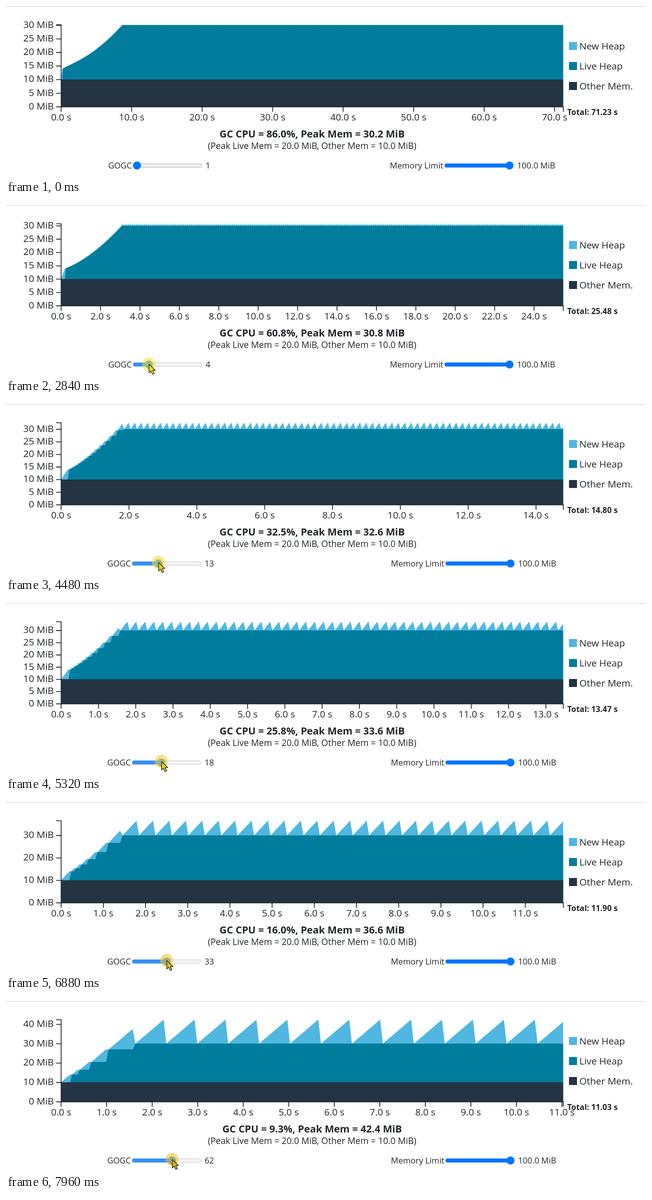
These frames come from a looping animation (1280 by 342 pixels, 8 s). An HTML page:

```html
<!DOCTYPE html>
<html lang="en">
<head>
<meta charset="utf-8">
<title>GC memory chart</title>
<style>
  html, body { margin: 0; width: 100%; height: 100%; overflow: hidden; background: #fff; }
  svg { display: block; width: 100vw; height: 100vh; }
  text { font-family: "Open Sans", "Noto Sans", sans-serif; fill: #212529; }
  .big { font-size: 19px; }
  .tick { font-size: 18.8px; text-anchor: middle; }
  .ylab { font-size: 19px; text-anchor: end; }
  .mid { text-anchor: middle; }
  .bold { font-weight: 700; }
  .ctl { font-size: 16.5px; }
  .end { text-anchor: end; }
  .axis { fill: none; stroke: #1c2026; stroke-width: 1.6; }
</style>
</head>
<body>
<svg id="stage" viewBox="0 0 1280 342"></svg>
<script>
const LOOP = 8000;
const LEFT = 110, RIGHT = 1114.3, TOP = 37.2, BASE = 201.3;
const COLORS = { fresh: '#50b7e0', live: '#007d9c', other: '#253443' };
const OTHER = 10, MAX_LIVE = 20, ALLOC_RATE = 20, WORK = 10;

const stage = document.getElementById('stage');

function add(tag, attrs, parent = stage, text) {
  const node = document.createElementNS('http://www.w3.org/2000/svg', tag);
  set(node, attrs);
  if (text !== undefined) node.textContent = text;
  parent.appendChild(node);
  return node;
}

function set(node, attrs) {
  for (const k in attrs) node.setAttribute(k, attrs[k]);
}

// Heap model: returns points [time, live, fresh] plus summary numbers.
function simulate(gogc) {
  const points = [[0, 0, 0]];
  let work = 0, gc = 0, live = 0, peak = 0;
  let room = 4;
  for (;;) {
    const dt = Math.min(room / ALLOC_RATE, WORK - work);
    work += dt;
    const heap = live + dt * ALLOC_RATE;
    peak = Math.max(peak, heap);
    points.push([work + gc, live, heap - live]);
    if (work >= WORK - 1e-9) break;
    live = Math.min(heap, MAX_LIVE);
    gc += 0.04 + live / 1024;
    points.push([work + gc, live, 0]);
    room = Math.max(0.063, live * gogc / 100);
  }
  return { points, total: work + gc, share: gc / (work + gc), peak: peak + OTHER };
}

function tickStep(span, count) {
  const raw = span / count;
  const pow = 10 ** Math.floor(Math.log10(raw));
  const r = raw / pow;
  return pow * (r >= Math.sqrt(50) ? 10 : r >= Math.sqrt(10) ? 5 : r >= Math.SQRT2 ? 2 : 1);
}

// Static parts
add('rect', { width: 1280, height: 342, fill: '#fff' });
add('rect', { width: 1280, height: 1, fill: '#cfcfcf' });
const fresh = add('path', { fill: COLORS.fresh });
const live = add('path', { fill: COLORS.live });
const other = add('rect', { x: LEFT, width: RIGHT - LEFT, fill: COLORS.other });
const axis = add('path', { class: 'axis', transform: 'translate(0.3 0.3)' });
const labels = add('g', {});
[['New Heap', COLORS.fresh], ['Live Heap', COLORS.live], ['Other Mem.', COLORS.other]].forEach(([name, fill], i) => {
  add('rect', { x: 1126, y: 72 + i * 40, width: 16, height: 16, fill });
  add('text', { x: 1146.7, y: 86.8 + i * 40, class: 'big' }, stage, name);
});
const total = add('text', { x: 1122.5, y: 217.5, class: 'bold', 'font-size': 15.9 });
const title = add('text', { x: 612.3, y: 263, class: 'bold mid', 'font-size': 19.85 });
add('text', { x: 612.2, y: 286, class: 'mid', 'font-size': 17.6 }, stage,
  '(Peak Live Mem = 20.0 MiB, Other Mem = 10.0 MiB)');

function slider(name, x) {
  const g = add('g', {});
  add('text', { x: x - 2.3, y: 325.3, class: 'ctl end' }, g, name);
  const track = add('rect', { x: x + 0.5, y: 315.5, width: 137, height: 7.2, rx: 3.6, 'stroke-width': 1 }, g);
  const fill = add('rect', { x, y: 315, height: 8.1, rx: 4 }, g);
  const thumb = add('circle', { cy: 319, r: 8 }, g);
  const value = add('text', { x: x + 145.2, y: 325.3, class: 'ctl' }, g);
  return {
    update(pos, text, look, shift) {
      set(g, { transform: `translate(${shift} 0)` });
      set(track, { fill: look.track, stroke: look.border });
      set(fill, { width: pos - x, fill: look.accent });
      set(thumb, { cx: pos, fill: look.accent });
      value.textContent = text;
    }
  };
}
const LOOKS = {
  rest: { track: '#efefef', border: '#b8b8b8', accent: '#0075ff' },
  hover: { track: '#e5e5e5', border: '#a8a8a8', accent: '#005cc8' },
  press: { track: '#f5f5f5', border: '#cbcbcb', accent: '#3a8ff5' }
};
const gogcSlider = slider('GOGC', 254);
const limitSlider = slider('Memory Limit', 877);

const halo = add('circle', { r: 13 });
const arrow = add('path', {
  d: 'M0 0V17L4 13.4L7 20L10.2 18.6L7.3 12.2H12.6Z',
  stroke: '#2c2a14', 'stroke-width': 1.3, 'stroke-linejoin': 'round'
});

// Draw the chart for one GOGC setting
let shown = 0;
function drawChart(gogc) {
  if (gogc === shown) return;
  shown = gogc;
  const sim = simulate(gogc);
  const px = s => LEFT + s / sim.total * (RIGHT - LEFT);
  const py = m => BASE - m / sim.peak * (BASE - TOP);
  const area = height => `M${LEFT} ${BASE}` + sim.points.map(p =>
    `L${px(p[0]).toFixed(2)} ${py(OTHER + height(p)).toFixed(2)}`).join('') + `L${RIGHT} ${BASE}Z`;
  set(fresh, { d: area(p => p[1] + p[2]) });
  set(live, { d: area(p => p[1]) });
  set(other, { y: py(OTHER), height: BASE - py(OTHER) });

  let d = `M100 ${TOP}H${LEFT}V${BASE}H100M${LEFT} ${BASE + 10}V${BASE}H${RIGHT}V${BASE + 10}`;
  labels.textContent = '';
  const ys = tickStep(sim.peak, 5);
  for (let m = 0; m <= sim.peak + 1e-6; m += ys) {
    d += `M100 ${py(m)}H${LEFT}`;
    add('text', { x: 95.5, y: py(m) + 5.5, class: 'ylab' }, labels, m + ' MiB');
  }
  const xs = tickStep(sim.total, 10);
  for (let s = 0; s <= sim.total; s += xs) {
    d += `M${px(s)} ${BASE}v10`;
    add('text', { x: px(s) + 0.3, y: 229, class: 'tick' }, labels, s.toFixed(1) + ' s');
  }
  set(axis, { d });
  total.textContent = `Total: ${sim.total.toFixed(2)} s`;
  title.textContent = `GC CPU = ${(sim.share * 100).toFixed(1)}%, Peak Mem = ${sim.peak.toFixed(1)} MiB`;
}

// Drag bursts: [start ms, end ms, steps, log2(GOGC) reached]
const DRAG = [
  [1430, 1680, 4, 0.85], [1910, 2140, 4, 1.2], [2290, 2520, 4, 1.55], [2670, 2840, 3, 1.95],
  [2990, 2990, 1, 2], [3170, 3300, 3, 2.3], [3470, 3780, 5, 3.1], [4080, 4480, 6, 3.7],
  [4920, 5470, 8, 4.33], [5700, 5700, 1, 4.34], [5940, 6330, 6, 4.8], [6480, 6560, 2, 4.95],
  [6880, 6940, 2, 5.14], [7110, 7270, 3, 5.4], [7410, 7960, 8, 5.955]
];
const PRESS = 1130;

// Share of a stepped burst done at time t
function stepped(t, start, end, n) {
  if (t < start) return 0;
  if (t >= end) return 1;
  return (Math.floor((t - start) / (end - start) * (n - 1) + 0.2) + 1) / n;
}

function dragValue(t) {
  let v = 0;
  for (const [start, end, n, goal] of DRAG) {
    if (t < start) break;
    v += (goal - v) * stepped(t, start, end, n);
  }
  return v;
}

function pointer(t, thumbX) {
  if (t < 120) return null;
  if (t < 980) {
    const p = stepped(t, 120, 910, 11);
    const e = 1 - (1 - p) ** 2;
    return [580 - 314 * e, 340 - 23 * e];
  }
  if (t < 1430) return [263.5, 318];
  return [thumbX, t < 3470 ? 318 : 316.5];
}

function draw(t) {
  const v = dragValue(t);
  const gogc = Math.round(2 ** v);
  const shift = gogc >= 10 ? 2 : 0;
  const pos = 262 + 12.1 * v;
  const at = pointer(t, pos - shift);
  const pressed = t >= PRESS;
  const over = at && at[0] < 392 && at[1] < 328;

  drawChart(gogc);
  gogcSlider.update(pos, gogc, LOOKS[pressed ? 'press' : over ? 'hover' : 'rest'], -shift);
  limitSlider.update(1007, '100.0 MiB', LOOKS.rest, shift);

  // The yellow drifts slowly towards gold
  const k = Math.min(1, Math.max(0, (t - 2000) / 6000));
  set(halo, { visibility: pressed ? 'visible' : 'hidden', fill: `rgba(${242 - 8 * k},${232 - 40 * k},40,0.55)` });
  set(arrow, { visibility: at ? 'visible' : 'hidden', fill: `rgb(${230 - 12 * k},${236 - 56 * k},28)` });
  if (at) {
    set(halo, { cx: at[0], cy: at[1] });
    set(arrow, { transform: `translate(${at[0] + 0.5} ${at[1] + 0.5})` });
  }
}

let began;
function tick(now) {
  if (began === undefined) began = now;
  draw(Math.max(0, now - began) % LOOP);
  requestAnimationFrame(tick);
}
draw(0);
requestAnimationFrame(tick);
</script>
</body>
</html>
```
